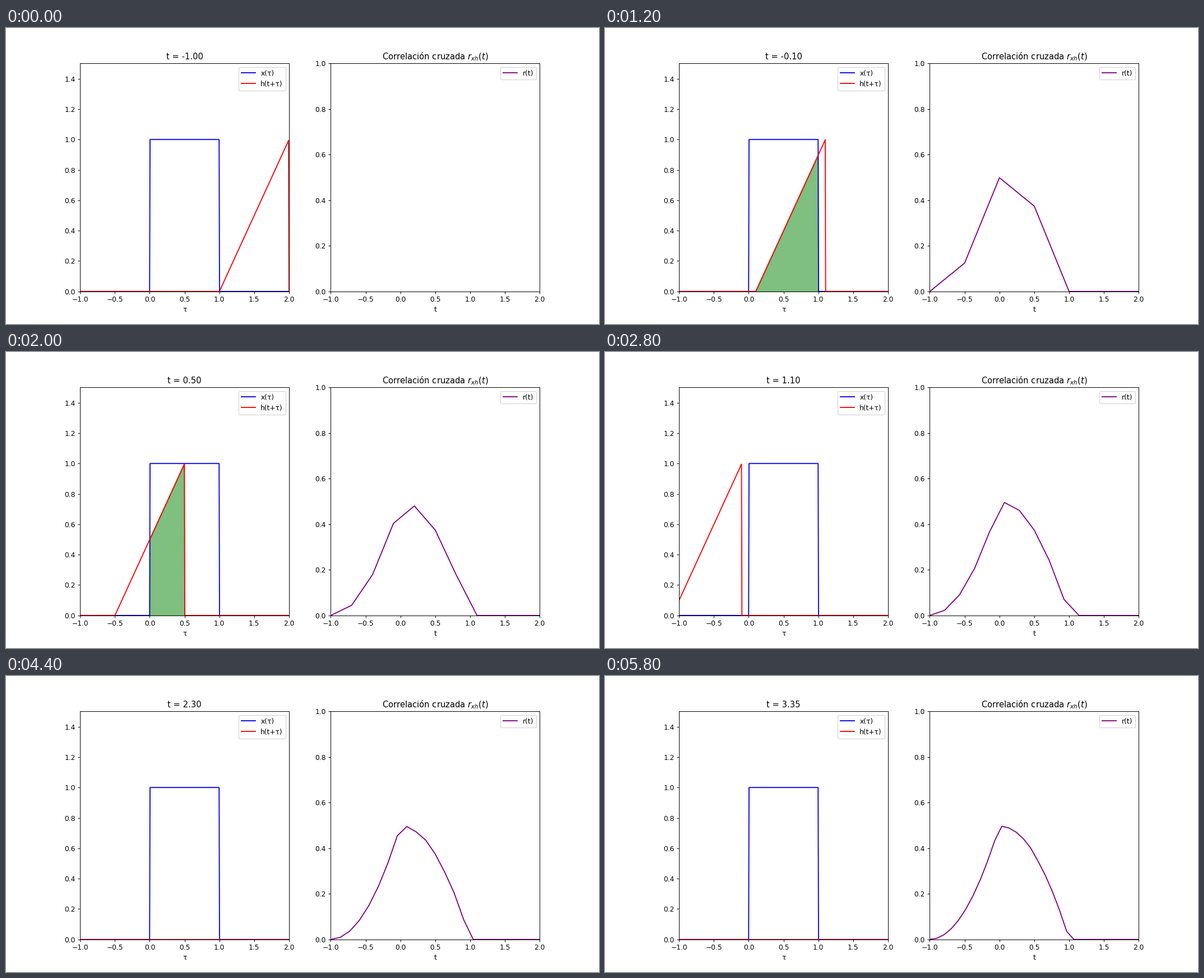
Recreate the animation shown at these times as a matplotlib script. Size 1058 px wide and 529 px high, loop 6 s.

```python
import numpy as np
import matplotlib.pyplot as plt
from matplotlib.animation import FuncAnimation

FRAMES, INTERVAL = 30, 200
T0, STEP = -1.0, 0.15

tau = np.linspace(-1, 2, 500)
dtau = tau[1] - tau[0]


def pulse(t):
    return np.where((t >= 0) & (t < 1), 1.0, 0.0)


def ramp(t):
    return t * pulse(t)


def correlate(t):
    return np.sum(pulse(tau) * ramp(tau + t)) * dtau


def set_up(ax, top, xlabel):
    ax.set_xlim(-1, 2)
    ax.set_ylim(0, top)
    ax.set_xlabel(xlabel)
    ax.legend(loc="upper right")


plt.rcParams["font.family"] = "DejaVu Sans"
fig, (left, right) = plt.subplots(1, 2, figsize=(12, 6), dpi=529 / 6)

left.plot(tau, pulse(tau), color="blue", label="x(τ)")
h_line, = left.plot([], [], color="red", label="h(t+τ)")
r_line, = right.plot([], [], color="purple", label="r(t)")
title = left.set_title("")
right.set_title("Correlación cruzada $r_{xh}(t)$")
set_up(left, 1.5, "τ")
set_up(right, 1.0, "t")

fills = []


def update(i):
    t = T0 + STEP * i
    h = ramp(tau + t)
    h_line.set_data(tau, h)
    title.set_text(f"t = {t:.2f}")

    while fills:
        fills.pop().remove()
    fills.append(left.fill_between(tau, pulse(tau) * h, color="green", alpha=0.5))

    # The curve gains one sample per step over a fixed span.
    ts = np.linspace(-1, 2, i + 1)
    r_line.set_data(ts, [correlate(s) for s in ts])
    return h_line, r_line, title, *fills


anim = FuncAnimation(fig, update, frames=FRAMES, interval=INTERVAL, repeat=True)
plt.show()
```
